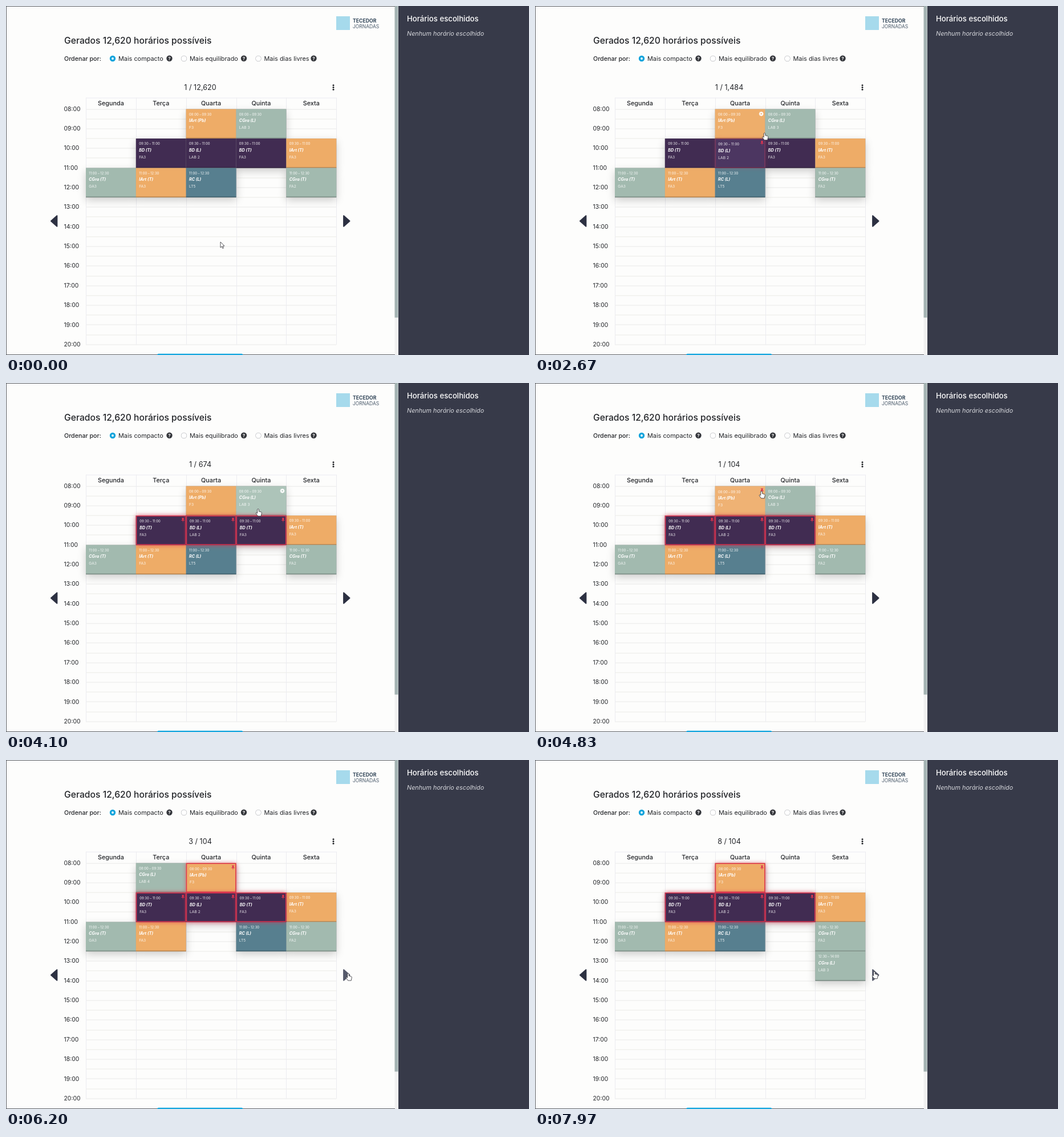
An HTML page with a canvas for the animation above (8000 ms loop, 917 by 611 pixels).

```html
<!DOCTYPE html>
<html lang="pt">
<head>
<meta charset="utf-8">
<title>Horários</title>
<style>
  html, body { margin: 0; width: 100%; height: 100%; overflow: hidden; background: #fdfdfc; }
  canvas { display: block; width: 100vw; height: 100vh; }
</style>
</head>
<body>
<canvas id="stage"></canvas>
<script>
const W = 917, H = 611, LOOP = 8000;
const canvas = document.getElementById('stage');
const ctx = canvas.getContext('2d');
const ratio = window.devicePixelRatio || 1;
canvas.width = W * ratio;
canvas.height = H * ratio;

const GRID = { x: 140, head: 160.5, y: 180.5, col: 87.85, slot: 17.18, cols: 5, slots: 24 };
const INK = '#222428', NAVY = '#2d3142', RED = '#dc3550';
const COLORS = {
  IArt: ['#eeac67', '#efb274'],
  CGra: ['#a2baaf', '#adc4b9'],
  BD: ['#412c52', '#513a67'],
  RC: ['#577f8f', '#668d9c']
};

const card = (col, slot, name, room, pinAt = Infinity) => ({
  col, slot, name, room, pinAt,
  x: GRID.x + col * GRID.col, y: GRID.y + slot * GRID.slot,
  w: GRID.col, h: 3 * GRID.slot
});

// Lessons shared by every timetable
const FIXED = [
  card(0, 6, 'CGra (T)', 'GA3'),
  card(1, 3, 'BD (T)', 'FA3', 3400),
  card(1, 6, 'IArt (T)', 'FA3'),
  card(2, 0, 'IArt (Pb)', 'F3', 4700),
  card(2, 3, 'BD (L)', 'LAB 2', 2400),
  card(3, 3, 'BD (T)', 'FA3', 3400),
  card(4, 3, 'IArt (T)', 'FA3'),
  card(4, 6, 'CGra (T)', 'FA2')
];
const lab = (col, slot, room) => card(col, slot, 'CGra (L)', room);
const net = (col, slot) => card(col, slot, 'RC (L)', 'LT5');
const OPTIONS = [
  [lab(3, 0, 'LAB 3'), net(2, 6)],
  [lab(1, 0, 'LAB 4'), net(2, 6)],
  [lab(1, 0, 'LAB 4'), net(3, 6)],
  [lab(3, 0, 'LAB 3'), net(1, 0)],
  [lab(1, 0, 'LAB 4'), net(3, 0)],
  [lab(0, 11, 'LAB 4'), net(3, 0)],
  [lab(1, 0, 'LAB 4'), net(3, 6)],
  [lab(4, 9, 'LAB 3'), net(2, 6)]
].map(extra => FIXED.concat(extra));

const NEXT_CLICKS = [5770, 6100, 6430, 6730, 7060, 7360, 7670];
const TOTALS = [[0, '12,620'], [2400, '1,484'], [3400, '674'], [4700, '104']];

// Pointer stops: time, x, y
const PATH = [
  [0, 376, 413], [860, 376, 413], [1180, 354, 256], [1320, 354, 256],
  [1650, 397, 240], [2560, 397, 240], [2670, 402.5, 222], [2950, 485, 240],
  [3720, 485, 240], [4020, 442, 221], [4130, 442, 220], [4480, 397, 189],
  [4980, 397, 189], [5220, 535, 290], [5400, 576, 328], [5660, 600, 373],
  [7100, 600, 374], [7850, 595, 370], [LOOP, 595, 370]
];

const ease = k => k * k * (3 - 2 * k);

function pointer(t) {
  t = Math.max(0, t);
  const i = Math.max(1, PATH.findIndex(p => p[0] >= t));
  const [t0, x0, y0] = PATH[i - 1], [t1, x1, y1] = PATH[i];
  const k = ease((t - t0) / (t1 - t0));
  return { x: x0 + (x1 - x0) * k, y: y0 + (y1 - y0) * k };
}

const inside = (p, r) => p.x >= r.x && p.x < r.x + r.w && p.y >= r.y && p.y < r.y + r.h;
const NEXT = { x: 590, y: 364, w: 16, h: 26 };

// Hover fades by averaging recent pointer hits
function hoverAmount(r, t) {
  let hits = 0;
  for (let k = 0; k < 10; k++) hits += inside(pointer(t - k * 20), r);
  return hits / 10;
}

function rect(x, y, w, h, fill) {
  ctx.fillStyle = fill;
  ctx.fillRect(x, y, w, h);
}

function disc(x, y, r, fill) {
  ctx.beginPath();
  ctx.arc(x, y, r, 0, Math.PI * 2);
  ctx.fillStyle = fill;
  ctx.fill();
}

function text(str, x, y, size, { weight = 400, fill = INK, align = 'left', italic = false } = {}) {
  ctx.font = `${italic ? 'italic ' : ''}${weight} ${size}px Inter, sans-serif`;
  ctx.textAlign = align;
  ctx.fillStyle = fill;
  ctx.fillText(str, x, y);
}

function option(x, label, helpX, on) {
  disc(x, 92, 5.2, on ? '#10a4dc' : '#b9bbbf');
  disc(x, 92, on ? 1.9 : 4.5, '#fff');
  text(label, x + 10, 95.8, 10.9);
  disc(helpX, 91.8, 5.2, '#34363b');
  text('?', helpX, 94.8, 8, { weight: 700, fill: '#fff', align: 'center' });
}

function arrow(x, dir, fill) {
  ctx.beginPath();
  ctx.moveTo(x - dir * 5.2, 367.2);
  ctx.lineTo(x - dir * 5.2, 385.8);
  ctx.lineTo(x + dir * 5.2, 376.5);
  ctx.closePath();
  ctx.fillStyle = ctx.strokeStyle = fill;
  ctx.lineWidth = 2;
  ctx.lineJoin = 'round';
  ctx.fill();
  ctx.stroke();
}

function drawHeader() {
  rect(579, 18, 24, 24, '#a6daec');
  text('TECEDOR', 608, 28.5, 8.7, { weight: 700, fill: '#33475a' });
  text('JORNADAS', 608, 39, 8.5, { fill: '#4a5a6b' });
  text('Gerados 12,620 horários possíveis', 102, 65.8, 15.7, { weight: 500 });
  text('Ordenar por:', 102, 95.8, 10.7, { weight: 500 });
  option(187, 'Mais compacto', 286.5, true);
  option(312, 'Mais equilibrado', 417, false);
  option(442.5, 'Mais dias livres', 539.5, false);
  for (let i = -1; i <= 1; i++) disc(574, 142.5 + i * 3.7, 1.5, INK);
}

function drawGrid() {
  const { x, head, y, col, slot, cols, slots } = GRID;
  const right = x + cols * col, bottom = y + slots * slot;
  rect(x, head, right - x, 1, '#ececf3');
  for (let i = 0; i <= slots; i++) {
    rect(x, Math.round(y + i * slot) - 0.5, right - x, 1, i % 2 ? '#ebebe7' : '#e9e9e9');
  }
  for (let i = 0; i <= cols; i++) rect(Math.round(x + i * col), head, 1, bottom - head, '#ececf0');
  ['Segunda', 'Terça', 'Quarta', 'Quinta', 'Sexta'].forEach((day, i) =>
    text(day, x + (i + 0.5) * col, 174.2, 10.8, { weight: 500, align: 'center' }));
  for (let h = 8; h <= 20; h++) {
    text(String(h).padStart(2, '0') + ':00', 101.5, 183.6 + (h - 8) * 2 * slot, 10.4);
  }
}

function drawSidebar() {
  rect(681.5, 0, 6.5, H, '#f1f1f1');
  rect(681.5, 0, 6, 545.5, '#a5b4b4');
  rect(688, 0, W - 688, H, '#373a49');
  text('Horários escolhidos', 703, 27, 13.2, { weight: 500, fill: '#fff' });
  text('Nenhum horário escolhido', 703, 52, 10.8, { fill: '#d7d8dd', italic: true });
}

function gear(x, y, hole) {
  ctx.save();
  ctx.translate(x, y);
  for (let i = 0; i < 4; i++) {
    rect(-0.95, -3.9, 1.9, 7.8, '#fff');
    ctx.rotate(Math.PI / 4);
  }
  ctx.restore();
  disc(x, y, 2.9, '#fff');
  disc(x, y, 1.25, hole);
}

function pin(x, y) {
  rect(x - 2, y - 3.6, 4, 1.2, RED);
  rect(x - 1.3, y - 3, 2.6, 3.5, RED);
  rect(x - 2.6, y, 5.2, 1.3, RED);
  rect(x - 0.4, y + 1, 0.8, 2.8, RED);
}

function clock(slot) {
  const m = 480 + slot * 30;
  return String(Math.floor(m / 60)).padStart(2, '0') + ':' + String(m % 60).padStart(2, '0');
}

function mix(a, b, k) {
  const part = (c, i) => parseInt(c.slice(i, i + 2), 16);
  return 'rgb(' + [1, 3, 5].map(i => Math.round(part(a, i) + (part(b, i) - part(a, i)) * k)) + ')';
}

function drawCard(c, t, hot) {
  const hover = hoverAmount(c, t);
  const pinned = t >= c.pinAt;
  const ring = pinned ? 1 - hover : 0;
  const fill = mix(...COLORS[c.name.split(' ')[0]], hover);

  if (ring > 0) {
    ctx.save();
    ctx.shadowColor = `rgba(225,45,75,${0.75 * ring})`;
    ctx.shadowBlur = 7 * ratio;
    rect(c.x, c.y, c.w, c.h, fill);
    ctx.restore();
  }
  rect(c.x, c.y, c.w, c.h, fill);
  rect(c.x, c.y + c.h - 1.6, c.w, 1.6, 'rgba(0,0,0,.22)');
  if (ring > 0) {
    ctx.globalAlpha = ring;
    ctx.strokeStyle = RED;
    ctx.lineWidth = 1.5;
    ctx.lineJoin = 'miter';
    ctx.strokeRect(c.x + 0.75, c.y + 0.75, c.w - 1.5, c.h - 1.5);
    ctx.globalAlpha = 1;
  }

  const x = c.x + 5.3 + ring, y = c.y + (pinned ? 1 : 0);
  text(`${clock(c.slot)} – ${clock(c.slot + 3)}`, x, y + 11, 5.8, { weight: 500, fill: 'rgba(255,255,255,.8)' });
  text(c.name, x, y + 22.8, 7.2, { weight: 700, fill: '#fff', italic: true });
  text(c.room, x, y + 34.6, 6.7, { fill: 'rgba(255,255,255,.85)' });
  if (pinned) pin(c.x + 82.3, c.y + 7.6);
  else if (hot) gear(c.x + 81, c.y + 8.3, fill);
}

function drawCards(cards, t, p) {
  ctx.save();
  ctx.shadowColor = 'rgba(0,0,0,.2)';
  ctx.shadowBlur = 14 * ratio;
  ctx.shadowOffsetY = 5 * ratio;
  for (const c of cards) rect(c.x, c.y, c.w, c.h, '#999');
  ctx.restore();
  const isPinned = c => t >= c.pinAt;
  const ordered = cards.filter(c => !isPinned(c)).concat(cards.filter(isPinned));
  for (const c of ordered) drawCard(c, t, inside(p, c));
}

const HAND = new Path2D('M-1.3 1Q0-.7 1.3 1V4.6L5.2 5.6Q6.5 6 6.3 7.6L5.2 12.8H-.4L-3.6 8.4Q-4.1 6.7-2.7 6.8L-1.3 8Z');
const POINTER = new Path2D('M0 0V10L2.3 7.9 3.9 11.4 5.5 10.7 3.9 7.3 7 7.1Z');

function drawPointer(p, hand) {
  ctx.save();
  ctx.translate(p.x, p.y);
  const shape = hand ? HAND : POINTER;
  ctx.fillStyle = '#fff';
  ctx.strokeStyle = '#2b2b30';
  ctx.lineWidth = 0.8;
  ctx.lineJoin = 'round';
  ctx.fill(shape);
  ctx.stroke(shape);
  ctx.restore();
}

function drawFrame() {
  rect(0, 0, 682, 1, '#5c5f66');
  rect(0, 0, 1, H, '#5c5f66');
  rect(0, H - 1, 682, 1, '#5c5f66');
  ctx.beginPath();
  ctx.roundRect(265, 608.7, 150.5, 8, 2.5);
  ctx.fillStyle = '#16a6de';
  ctx.fill();
}

function draw(t) {
  ctx.setTransform(ratio, 0, 0, ratio, 0, 0);
  rect(0, 0, W, H, '#fdfdfc');
  const p = pointer(t);
  const index = NEXT_CLICKS.filter(c => t >= c).length;
  const total = TOTALS.filter(s => t >= s[0]).pop()[1];
  const cards = OPTIONS[index];

  drawHeader();
  text(`${index + 1} / ${total}`, 340.5, 147.2, 12.6, { align: 'center' });
  drawGrid();
  drawCards(cards, t, p);
  arrow(84.2, -1, NAVY);
  arrow(597.3, 1, mix(NAVY, '#565a6b', hoverAmount(NEXT, t)));
  drawSidebar();
  drawFrame();
  drawPointer(p, inside(p, NEXT) || cards.some(c => inside(p, c)));
}

let start;
function tick(now) {
  start ??= now;
  draw((now - start) % LOOP);
  requestAnimationFrame(tick);
}
draw(0);
requestAnimationFrame(tick);
</script>
</body>
</html>
```
